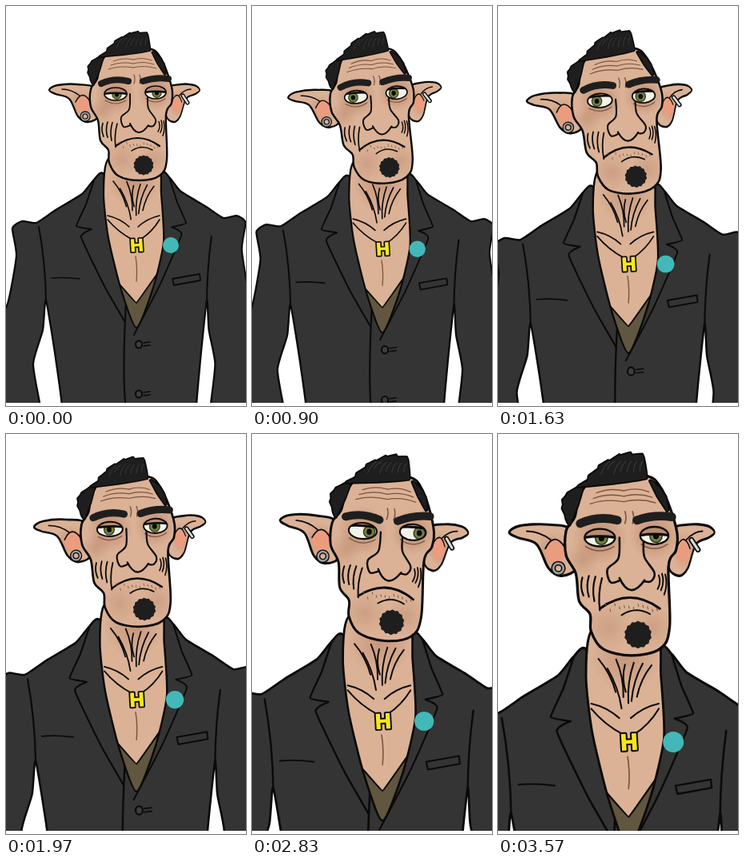
Animation of 300 by 500 pixels, one loop 3610 ms. Source, as an HTML page with a canvas:

```html
<!DOCTYPE html>
<html lang="en">
<head>
<meta charset="utf-8">
<title>Goblin in a jacket</title>
<style>
html, body { margin: 0; width: 100%; height: 100%; overflow: hidden; background: #fff; }
canvas { display: block; width: 300px; height: 500px; }
</style>
</head>
<body>
<canvas id="stage" width="300" height="500"></canvas>
<script>
const LOOP = 3610;
const INK = '#0b0a09', CLOTH = '#343434', SKIN = '#dbb296', LID = '#b98c72', HAIR = '#1f1e1e', WRINKLE = '#7b5440';
const ctx = document.getElementById('stage').getContext('2d');

function ease(t, from, to) {
  const u = Math.max(0, Math.min(1, (t - from) / (to - from)));
  return u * u * (3 - 2 * u);
}

// Repeatable noise in 0..1.
function noise(i) {
  const v = Math.sin(i * 12.9898) * 43758.5453;
  return v - Math.floor(v);
}

// Smooth path through [x, y] points; bend 0 gives straight edges.
function trace(pts, bend = 1 / 6, closed = true) {
  const n = pts.length;
  const at = i => pts[closed ? (i + n) % n : Math.max(0, Math.min(n - 1, i))];
  ctx.beginPath();
  ctx.moveTo(...pts[0]);
  for (let i = 0; i < n - !closed; i++) {
    const [a, b, c, d] = [at(i - 1), at(i), at(i + 1), at(i + 2)];
    ctx.bezierCurveTo(b[0] + (c[0] - a[0]) * bend, b[1] + (c[1] - a[1]) * bend,
      c[0] - (d[0] - b[0]) * bend, c[1] - (d[1] - b[1]) * bend, ...c);
  }
  if (closed) ctx.closePath();
}

function ink(width, color = INK) {
  ctx.lineWidth = width;
  ctx.strokeStyle = color;
  ctx.stroke();
}

function shape(pts, fill, width = 2.2, bend = 1 / 6, shade) {
  trace(pts, bend);
  ctx.fillStyle = fill;
  ctx.fill();
  if (shade) {
    ctx.save();
    ctx.clip();
    shade();
    ctx.restore();
    trace(pts, bend);
  }
  if (width) ink(width);
}

function line(pts, width, bend) {
  trace(pts, bend, false);
  ink(width);
}

// One arc from a to b, bulging sideways by bow.
function crease(x0, y0, x1, y1, bow = 0, width = 1.6, color = INK) {
  const len = Math.hypot(x1 - x0, y1 - y0);
  ctx.beginPath();
  ctx.moveTo(x0, y0);
  ctx.quadraticCurveTo((x0 + x1) / 2 + 2 * bow * (y1 - y0) / len,
    (y0 + y1) / 2 - 2 * bow * (x1 - x0) / len, x1, y1);
  ink(width, color);
}

function oval(x, y, rx, ry, fill) {
  ctx.beginPath();
  ctx.ellipse(x, y, rx, ry, 0, 0, 7);
  ctx.fillStyle = fill;
  ctx.fill();
}

function glow(x, y, r, alpha) {
  const g = ctx.createRadialGradient(x, y, 0, x, y, r);
  g.addColorStop(0, `rgba(150,85,58,${alpha})`);
  g.addColorStop(1, 'rgba(150,85,58,0)');
  oval(x, y, r, r, g);
}

function mirrored(axis, stretch, shear, paint) {
  ctx.save();
  ctx.transform(-stretch, shear, 0, 1, axis * (1 + stretch), -shear * axis);
  paint();
  ctx.restore();
}

function halfJacket() {
  shape([[123, 211], [110, 217], [95, 235], [62, 255], [38, 271], [20, 269], [8, 278], [13, 312], [2, 372],
    [-25, 430], [-25, 520], [163, 520], [163, 300]], CLOTH, 2.3, .09);
  line([[110, 218], [100, 248], [88, 275], [107, 279]], 2, .05);
  line([[107, 279], [94, 289], [124, 352], [158, 411]], 2, .07);
}

// Armhole seam and the daylight between sleeve and waist.
function armGap(x, side, shoulderY) {
  crease(x - side * 9, shoulderY, x, 370, side * 2, 2);
  const edge = [[0, 368], [-4, 405], [-16, 447], [-8, 496], [-6, 520], [21, 520], [13, 447]];
  shape(edge.map(([dx, y]) => [x + dx * side, y]), '#fff', 2.3, .1);
}

function button(y) {
  oval(166, y, 4, 4.6, '#3d3d3d');
  ink(2);
  for (const dy of [-2, 2]) crease(172, y + dy, 180, y + dy - 1, 0, 1.5);
}

function drawJacket() {
  halfJacket();
  mirrored(159, .93, .05, halfJacket);
  armGap(50, 1, 276);
  armGap(251, -.65, 288);
  crease(57, 340, 92, 341, 1);
  shape([[208, 341], [242, 335], [243, 343], [210, 349]], CLOTH, 1.8, 0);
  button(423);
  button(485);
}

function drawChest() {
  shape([[129, 190], [122, 235], [128, 290], [144, 355], [163, 402], [184, 352], [197, 295], [194, 235], [189, 190]],
    SKIN, 2.2, .11, () => {
      glow(160, 218, 34, .3);
      shape([[130, 335], [163, 371], [200, 320], [200, 420], [130, 420]], '#61563f', 1.8, .02);
    });
  for (let i = 0; i < 7; i++) {
    const x = 134 + i * 8.5, y = 219 + noise(i) * 10, pull = .45 + noise(i + 9) * .3;
    crease(x, y, x + (161 - x) * pull, y + 52 * pull, i < 3 ? 2 : -2);
  }
  for (const [x, side] of [[127, 1], [192, -1]]) {
    crease(x, 262, x + side * 27, 276, side * 2);
    crease(x, 267, 163 - side * 5, 292, -side * 2);
  }
  crease(162, 313, 163, 344, 1, 1.3, WRINKLE);
}

function drawPendant() {
  ctx.save();
  ctx.translate(163.5, 299);
  ctx.rotate(-.06);
  ctx.font = '900 22px Inter, "DejaVu Sans", sans-serif';
  ctx.textAlign = 'center';
  ctx.lineWidth = 3.2;
  ctx.strokeStyle = INK;
  ctx.strokeText('H', 0, 8);
  ctx.fillStyle = '#f5e61d';
  ctx.fillText('H', 0, 8);
  ctx.restore();
  oval(206, 299, 10, 10, '#43b8b8');
}

function drawEar() {
  shape([[54, 105], [64, 99], [90, 98], [112, 104], [116, 136], [102, 145], [90, 138], [79, 116], [62, 110]],
    SKIN, 2.3, 1 / 6, () => glow(94, 122, 18, .35));
  oval(96, 123, 9, 10, '#ec9c7e');
  crease(70, 104, 92, 112, 2, 1.4);
  crease(87, 120, 105, 119, 8, 1.4);
}

function drawEarrings() {
  for (const [width, color] of [[4.2, INK], [2, '#9b9e9e']]) {
    ctx.beginPath();
    ctx.arc(99, 138, 4.6, 0, 7);
    ink(width, color);
  }
  crease(221, 112, 227, 121, 0, 5);
  crease(221, 112, 227, 121, 0, 2.4, '#d5d9dc');
}

function drawEye(x, y, rx, gaze, open) {
  const ry = 8, lid = y - ry + 2 * ry * (.08 + (1 - open) * .62);
  ctx.save();
  oval(x, y, rx, ry, '#f3f2e9');
  ctx.clip();
  oval(x + gaze, y + .5, 5.6, 5.8, '#74803f');
  ink(1.2, '#36401f');
  oval(x + gaze, y + .5, 2.6, 2.9, INK);
  ctx.fillStyle = LID;
  ctx.fillRect(x - rx, y - ry, rx * 2, lid - y + ry);
  crease(x - rx, lid + 1, x + rx, lid + 1, 1, 2.4);
  ctx.restore();
  ctx.beginPath();
  ctx.ellipse(x, y, rx, ry, 0, 0, 7);
  ink(1.7);
  crease(x - rx + 1, y + 8, x + rx - 1, y + 8, -4, 1.1, WRINKLE);
}

function drawNose() {
  line([[155, 110], [154, 129], [144, 139], [147, 151], [156, 149]], 1.9);
  line([[177, 114], [178, 128], [187, 142], [184, 150], [178, 150]], 1.9);
  crease(155, 147, 178, 149, -10, 2);
}

function drawMouth() {
  crease(137, 175, 192, 175, 10, 2.2);
  crease(157, 181, 183, 180, 4, 1.5);
  for (let i = 0; i < 12; i++) {
    const x = 142 + i * 4.3, y = 170 + noise(i) * 6;
    crease(x, y, x + .5, y + 2, 0, .8, WRINKLE);
  }
  const goatee = Array.from({ length: 28 }, (_, i) => {
    const a = i / 28 * 2 * Math.PI, r = 11.6 + i % 2;
    return [172 + r * Math.cos(a), 199 + r * Math.sin(a)];
  });
  shape(goatee, HAIR, 0);
}

function drawFace(gaze, open, frown) {
  shape([[114, 91], [119, 70], [135, 55], [178, 53], [194, 66], [207, 101], [207, 121], [200, 136], [201, 192],
    [192, 212], [166, 218], [140, 212], [129, 196], [128, 180], [118, 168], [115, 143], [106, 126], [106, 104]],
    SKIN, 2.4, 1 / 6, () => {
      glow(137, 110, 25, .45);
      glow(187, 108, 23, .45);
      glow(121, 130, 16, .25);
      glow(145, 192, 22, .2);
      glow(186, 192, 20, .2);
    });
  for (let i = 0; i < 3; i++) {
    crease(134 - i * 3, 69 + i * 5, 159, 67 + i * 5, 2, 1, WRINKLE);
    crease(159, 67 + i * 5, 182 + i * 3, 68 + i * 5, 2, 1, WRINKLE);
  }
  for (const x of [160, 167]) crease(x, 86, x, 97, 1, 1.2, WRINKLE);

  drawEye(137, 110, 14, gaze, open);
  drawEye(187, 108, 13, gaze, open);
  crease(119, 97, 153, 94 + frown * 4, 3, 8, HAIR);
  crease(171, 94 + frown * 4, 203, 91, 2, 8, HAIR);

  drawNose();
  for (let i = 0; i < 4; i++) {
    const y = 142 + noise(i + 3) * 8, drop = 14 + noise(i + 7) * 16;
    crease(121 + i * 6, y, 122 + i * 5, y + drop, -1.5);
    if (i < 3) crease(191 + i * 3, y - 2, 190 + i * 3, y + drop - 6, 1.5, 1.4);
  }
  drawMouth();
}

// Ragged hair standing off the line a-b; span sets how far the swell runs.
function tuft([ax, ay], [bx, by], height, span, spikes, lean = 0) {
  const len = Math.hypot(bx - ax, by - ay), nx = (by - ay) / len, ny = (ax - bx) / len;
  const pts = [];
  for (let i = 0; i <= spikes * 2; i++) {
    const u = i / spikes / 2;
    const h = height * Math.sin(Math.PI * span * u) * (i % 2 ? 1 : .83 + noise(i + spikes) * .1);
    pts.push([ax + (bx - ax) * u + nx * h + (i % 2) * lean, ay + (by - ay) * u + ny * h]);
  }
  pts.push([bx - nx * 2, by - ny * 2], [(ax + bx) / 2 - nx * 3, (ay + by) / 2 - ny * 3], [ax - nx * 2, ay - ny * 2]);
  shape(pts, HAIR, 1.5, .04);
}

function drawHair() {
  tuft([108, 98], [121, 61], 13, 1, 5);
  tuft([184, 57], [200, 85], 5, 1, 4);
  tuft([117, 62], [180, 54], 25, .72, 6, 4);
  for (let i = 0; i < 7; i++) crease(138 + i * 6, 52 - noise(i) * 5, 146 + i * 5, 40, 1, .8, '#393b3e');
}

function draw(t) {
  ctx.setTransform(1, 0, 0, 1, 0, 0);
  ctx.fillStyle = '#fff';
  ctx.fillRect(0, 0, 300, 500);
  ctx.save();
  ctx.beginPath();
  ctx.rect(0, 0, 300, 496);
  ctx.clip();

  // Slowly accelerating push-in after the first glance.
  const s = Math.max(0, t - 700) / 1000;
  const zoom = 1 + .08 * s + .0085 * s * s;
  ctx.translate(162, 12);
  ctx.scale(zoom, zoom);
  ctx.translate(-162, -12);
  drawJacket();
  drawChest();
  drawPendant();

  // The head looks to one side (-1), then the other (1), then ahead (0).
  const look = -ease(t, 100, 600) + 2 * ease(t, 1750, 2400) - ease(t, 2870, 3570);
  const size = 1 + s * .017;
  ctx.translate(172, 205 - s);
  ctx.rotate(look * 3.9 * Math.PI / 180);
  ctx.scale(size, size);
  ctx.translate(-172, -205);
  drawEar();
  mirrored(166, .68, 0, drawEar);
  drawEarrings();
  drawFace(1.5 + look * 5, .45 + .4 * Math.abs(look), Math.max(0, look));
  drawHair();
  ctx.restore();
}

ctx.lineCap = ctx.lineJoin = 'round';
const start = performance.now();
function tick() {
  draw((performance.now() - start) % LOOP);
  requestAnimationFrame(tick);
}
tick();
</script>
</body>
</html>
```
